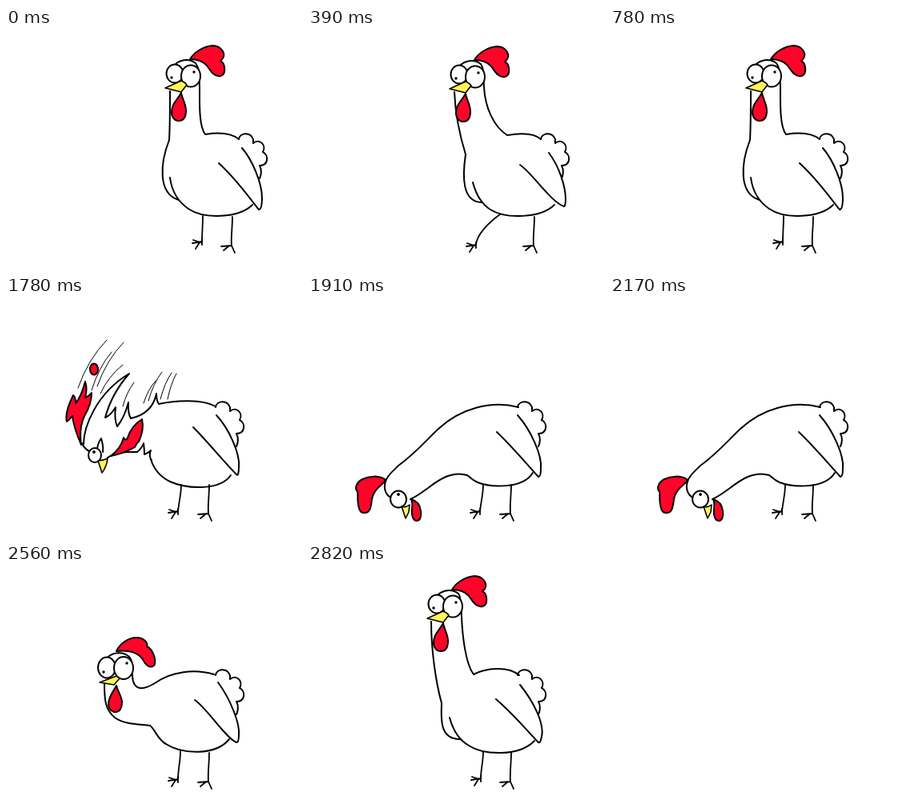
These frames come from a looping animation (370 px wide and 300 px high, 2.95 s). An HTML page:

```html
<!DOCTYPE html>
<html lang="en">
<head>
<meta charset="utf-8">
<title>Pecking hen</title>
<style>
html, body { margin: 0; width: 100%; height: 100%; overflow: hidden; background: #fff; }
svg { display: block; width: 370px; height: 300px; }
.ink { fill: none; stroke: #000; stroke-width: 2; stroke-linecap: round; stroke-linejoin: round; }
.red { fill: #ff0429; }
.yellow { fill: #fff556; }
.white { fill: #fff; }
.thin { stroke-width: 1; }
.leg { stroke-width: 1.8; }
.dot { stroke: none; fill: #000; }
</style>
</head>
<body>
<svg viewBox="0 0 370 300">
  <g id="hen" class="ink">
    <path id="comb" class="red"/>
    <path id="back"/>
    <path id="front"/>
    <path id="belly"/>
    <path d="M262 139C263 131 276 129 280 139L280 144C288 137 297 147 292 155C300 159 299 172 288 172C291 177 290 184 288 188"/>
    <path id="wing"/>
    <path id="leg" class="leg"/>
    <path id="foot" class="leg" d="M0 0L-12 2M-3 1L-8 9M-11 -2L-2 1M0 -3L0 4"/>
    <path class="leg" d="M254 236C254 250 252 262 253 272L240 273M249 273L243 278M253 272L257 281"/>
    <path id="wattle" class="red"/>
    <ellipse id="eyeL" class="white"/>
    <ellipse id="eyeR" class="white"/>
    <path id="beak" class="yellow" stroke-width="1.6"/>
    <circle id="dotL" class="dot" r="1.7"/>
    <circle id="dotR" class="dot" r="1.7"/>
    <path id="speed" class="thin"/>
  </g>
</svg>
<script>
const $ = id => document.getElementById(id);
const NUM = /-?\d+(\.\d+)?/g;
const paths = ['comb', 'back', 'front', 'belly', 'wing', 'leg', 'wattle', 'beak'];

// Moves every x,y pair in a string of coordinates.
const shift = (s, dx, dy) => {
  let i = 0;
  return s.replace(NUM, n => +n + (i++ % 2 ? dy : dx));
};

const mix = (a, b, t) => {
  if (!t) return a;
  const to = b.match(NUM);
  let i = 0;
  return a.replace(NUM, n => (+n + (to[i++] - n) * t).toFixed(2));
};

const head = {
  comb: 'M201 39C206 30 218 23 229 22C240 22 249 34 239 41C245 44 247 58 239 60C231 62 226 52 222 47C217 41 209 39 201 39Z',
  wattle: 'M190 81C185 90 178 95 178 105C178 112 182 116 187 116C193 116 196 111 196 103C196 95 191 88 190 81Z',
  beak: 'M170 75L190 66Q195 68 197 71L190 80Z',
  eyes: '182 57 202 60 178 62 206 55',
  size: '10.5 11.5 12 13.5'
};
const headAt = (dx, dy) => {
  const h = { size: head.size };
  for (const k of ['comb', 'wattle', 'beak', 'eyes']) h[k] = shift(head[k], dx, dy);
  return h;
};

const leg = 'M217 235C217 247 216 257 216 267';

const rest = {
  ...head, leg,
  back: 'M183 45C190 39 201 38 208 44C214 52 212 62 213 73C213 95 212 122 220 133C232 131 251 130 262 139',
  front: 'M176 79C176 100 176 120 175 140C164 168 160 207 187 215',
  belly: 'M176 187C178 203 186 217 199 226C218 239 262 238 279 221',
  wing: 'M237 169C258 188 272 208 287 227M266 150C279 165 291 194 291 212C291 220 290 227 287 227'
};

const step = {
  ...headAt(-22, 1),
  leg: 'M211 233C197 243 182 258 181 271',
  back: 'M162 46C169 40 180 39 187 45C192 52 190 62 191 73C192 100 204 124 220 134C232 132 252 130 262 139',
  front: 'M154 80C155 105 160 132 168 158C164 185 163 218 189 218',
  belly: 'M177 193C181 208 188 220 199 227C218 239 262 238 279 221',
  wing: 'M236 171C252 182 274 217 291 223M272 156C285 173 293 198 293 214C293 220 292 223 291 223'
};

const tall = {
  ...headAt(-21, -7),
  leg: 'M219 235C219 247 216 257 216 268',
  back: 'M163 38C170 32 181 31 188 37C193 45 191 55 192 66C193 90 197 125 207 138C222 130 250 127 264 139',
  front: 'M154 72C154 105 159 145 167 174C166 195 165 219 190 219',
  belly: 'M177 192C181 207 189 220 201 227C220 239 264 241 283 221',
  wing: 'M235 169C255 186 270 204 288 223M265 151C282 172 296 200 292 216C291 221 290 224 288 223'
};

const low = {
  leg: 'M218 234C218 247 215 257 215 269',
  comb: 'M138 109C141 101 152 92 163 92C172 92 178 98 176 103C183 106 189 120 185 127C180 131 174 126 172 121C166 110 152 107 138 109Z',
  wattle: 'M138 152C134 160 128 166 128 175C128 181 132 185 137 185C142 185 145 180 145 173C145 166 140 160 138 152Z',
  beak: 'M117 148L138 140Q141 142 142 143L135 151Z',
  eyes: '126 129.5 147 130 122 135 151 124',
  size: '11 13 12 14',
  back: 'M127 117C132 111 146 108 154 116C159 122 158 132 158 140C159 160 173 157 186 149C207 134 236 131 260 138',
  front: 'M123 150C123 170 124 182 136 192C147 200 162 200 180 202',
  belly: 'M180 202C186 206 189 219 200 225C220 238 262 240 279 219',
  wing: 'M236 170C252 181 274 217 288 223M265 148C280 168 293 200 291 214C291 220 290 223 288 223'
};

const down = {
  leg: 'M219 236C219 248 216 258 215 269',
  comb: 'M96 229C88 224 76 225 68 229C60 233 58 241 62 245C62 255 62 272 70 271C79 272 79 260 80 253C82 243 90 238 96 232Z',
  wattle: 'M129 254C132 260 129 266 130 273C131 279 133 281 136 281C140 281 142 276 141 269C140 260 136 256 129 254Z',
  beak: 'M122 278L117 263Q122 265 127 261L126 270Z',
  eyes: '113 254 113 254 113 248 113 248',
  size: '9 9 10 10.5',
  back: 'M104 252C97 249 94 240 97 232C98 225 107 218 113 212C135 196 148 180 163 166C190 141 228 130 263 139',
  front: 'M128 254C137 250 143 245 150 240C163 230 180 218 199 224',
  belly: 'M199 224C203 227 205 230 212 233C228 239 268 242 281 221',
  wing: 'M236 170C252 185 270 206 288 226M262 149C279 168 293 200 291 216C291 222 290 226 288 226'
};

const smear = {
  leg: down.leg,
  comb: 'M94 186C88 172 84 160 83 150Q79 155 76 157Q73 146 84 124Q87 126 87 134Q94 126 99 107Q102 116 99 127Q104 125 107 121Q107 135 98 150Q91 165 94 186ZM105 92a5 7 0 1 0 10 -1a5 7 0 1 0 -10 1Z',
  wattle: 'M131 200Q144 190 147 177Q150 182 152 177Q157 162 170 154Q173 167 166 182Q163 184 161 189Q147 197 131 200Z',
  beak: 'M115 206L120 221Q126 213 127 203Q121 206 115 206Z',
  eyes: '111 199 111 199 110 195 110 195',
  size: '7 7 8 9',
  back: 'M95 184Q98 191 104 194M97 185C97 165 112 122 154 97Q132 122 124 152Q131 149 137 139Q135 154 139 163Q148 152 153 133Q152 146 156 153Q183 147 188 122Q188 131 191 135C213 130 246 129 262 138M114 191Q115 183 119 178Q122 188 121 195',
  front: 'M127 202C140 194 150 195 164 195Q170 190 172 184Q173 193 173 198Q177 197 181 193Q178 199 182 206',
  belly: 'M181 204C184 214 191 225 205 232C228 242 268 243 281 224',
  wing: 'M234 164C252 182 272 207 288 223M263 149C279 166 293 198 291 214C291 220 290 226 288 223'
};

// x, y of the top end, then the run to the left and down.
const streaks = [[126, 55, 36, 60], [147, 58, 33, 55], [132, 70, 25, 48], [146, 86, 28, 36],
  [160, 108, 14, 30], [187, 106, 15, 28], [195, 95, 17, 36], [207, 96, 14, 33], [213, 97, 11, 32]];
const speedLines = streaks.map(([x, y, w, h]) =>
  `M${x} ${y}q${-w * .65} ${h * .4} ${-w} ${h}`).join('');

// from pose, to pose, blend, body offset
const beats = [
  [rest, step, 0, 29], [rest, step, .33, 29], [rest, step, .67, 29], [step, rest, 0, 29],
  [step, rest, .3, 21], [step, rest, .6, 13], [rest, rest, 0, 0],
  [smear, smear, 0, 0], [down, low, 0, 0], [down, low, .05, 0], [down, low, 0, 0], [down, low, .04, 0],
  [down, low, .5, 0], [low, tall, 0, 0], [low, tall, .5, 0], [tall, tall, 0, 0]
];
const BEAT = 130, REST = 6, HOLD = 1000, LOOP = 15 * BEAT + HOLD;

const place = (id, attrs) => {
  for (const k in attrs) $(id).setAttribute(k, attrs[k]);
};

function draw([a, b, t, dx]) {
  const val = k => mix(a[k], b[k], t);
  for (const k of paths) place(k, { d: val(k) });
  const [lx, ly, rx, ry, px, py, qx, qy] = val('eyes').split(' ');
  const [lw, lh, rw, rh] = val('size').split(' ');
  place('eyeL', { cx: lx, cy: ly, rx: lw, ry: lh });
  place('eyeR', { cx: rx, cy: ry, rx: rw, ry: rh });
  place('dotL', { cx: px, cy: py });
  place('dotR', { cx: qx, cy: qy });
  place('foot', { transform: `translate(${val('leg').match(NUM).slice(-2)})` });
  place('speed', { d: a === smear ? speedLines : '' });
  place('hen', { transform: `translate(${dx})` });
}

const beatAt = ms => {
  const hold = REST * BEAT;
  if (ms < hold) return Math.floor(ms / BEAT);
  if (ms < hold + HOLD) return REST;
  return REST + 1 + Math.floor((ms - hold - HOLD) / BEAT);
};

const start = performance.now();
let shown = -1;
function tick() {
  const i = beatAt((performance.now() - start) % LOOP);
  if (i !== shown) draw(beats[shown = i]);
  requestAnimationFrame(tick);
}
tick();
</script>
</body>
</html>
```
